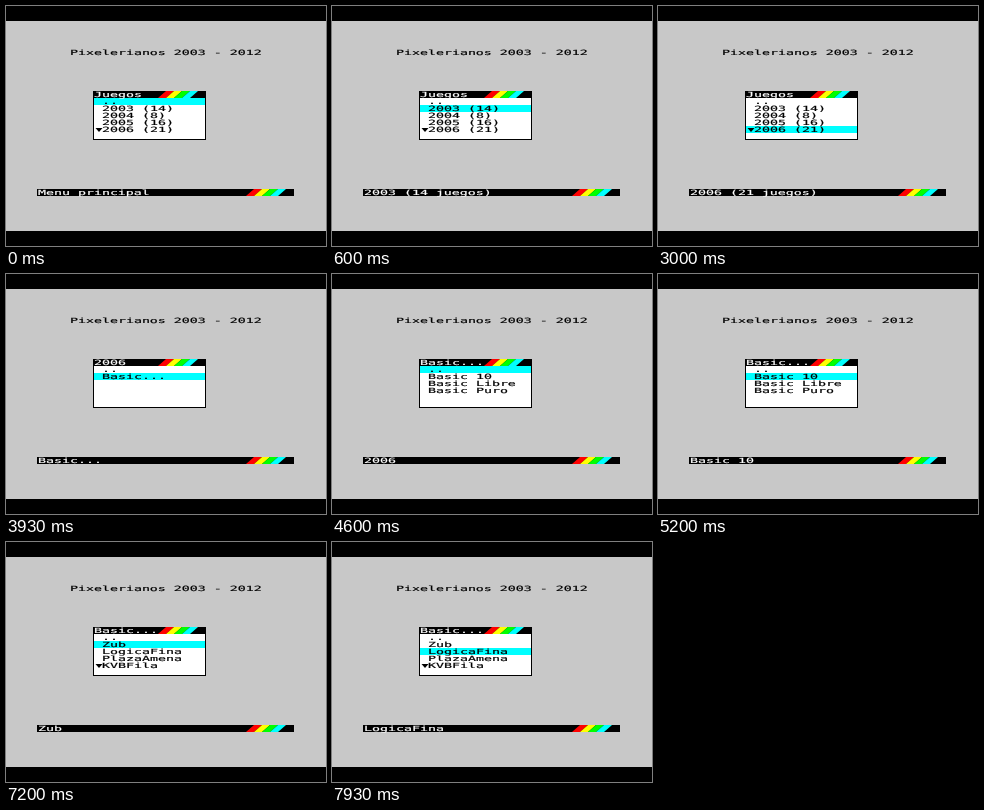
Animation of 320 by 240 pixels, one loop 8000 ms. Source, as an HTML page:

```html
<!DOCTYPE html>
<html lang="es">
<head>
<meta charset="utf-8">
<title>Menú</title>
<style>
  html, body { margin: 0; width: 100%; height: 100%; overflow: hidden; background: #000; }
  svg { display: block; width: 320px; height: 240px; }
  text {
    font: 7.2px "DejaVu Sans Mono", monospace;
    white-space: pre;
    text-rendering: geometricPrecision;
    stroke-width: .15;
  }
  .ink { fill: #000; stroke: #000; }
  .paper { fill: #fff; stroke: #fff; }
</style>
</head>
<body>
<svg id="stage" viewBox="0 0 320 240"></svg>
<script>
const LOOP = 8000;
const CELL_W = 8, CELL_H = 7, LEFT = 32, TOP = 36;
const WIDE = CELL_W / (7.2 * 0.602); // pixels of the screen are wider than tall
const stage = document.getElementById('stage');

const colX = c => LEFT + c * CELL_W;
const rowY = r => TOP + r * CELL_H;

function add(tag, attrs) {
  const el = document.createElementNS('http://www.w3.org/2000/svg', tag);
  for (const k in attrs) el.setAttribute(k, attrs[k]);
  stage.appendChild(el);
  return el;
}

const rect = (x, y, width, height, fill) => add('rect', { x, y, width, height, fill });

function label(col, row, cls, str = '') {
  const el = add('text', {
    class: cls,
    transform: `translate(${colX(col)} ${rowY(row) + 6.1}) scale(${WIDE} 1)`
  });
  el.textContent = str;
  return el;
}

function stripes(col, row) {
  const y = rowY(row);
  ['#f00', '#ff0', '#0f0', '#0ff'].forEach((fill, i) => {
    const x = colX(col + i);
    add('path', { fill, d: `M${x} ${y + 7}L${x + 8} ${y}H${x + 16}L${x + 8} ${y + 7}Z` });
  });
}

// fixed parts
rect(0, 15, 320, 210, '#c8c8c8');
label(4, 1, 'ink', 'Pixelerianos 2003 - 2012');
rect(87, 85, 113, 49, '#000');
rect(88, 92, 111, 41, '#fff');
rect(31, 183, 257, 7, '#000');
stripes(15, 7);
stripes(26, 21);

// changing parts
const bar = rect(88, 92, 111, 7, '#0ff');
const title = label(7, 7, 'paper');
const items = [8, 9, 10, 11, 12].map(r => label(8, r, 'ink'));
const more = add('path', { d: 'M89.5 122H96.5L93 126Z' });
const status = label(0, 21, 'paper');

const menus = {
  games: { title: 'Juegos', more: true, items: ['..', '2003 (14)', '2004 (8)', '2005 (16)', '2006 (21)'] },
  year: { title: '2006', items: ['..', 'Basic...'] },
  basic: { title: 'Basic...', items: ['..', 'Basic 10', 'Basic Libre', 'Basic Puro'] },
  pure: { title: 'Basic...', more: true, items: ['..', 'Zub', 'LogicaFina', 'PlazaAmena', 'KVBFila'] }
};

// start time, menu, selected line, status text
const steps = [
  [0, 'games', 0, 'Menu principal'],
  [400, 'games', 1, '2003 (14 juegos)'],
  [800, 'games', 2, '2004 (8 juegos)'],
  [1270, 'games', 3, '2005 (16 juegos)'],
  [1600, 'games', 4, '2006 (21 juegos)'],
  [3330, 'year', 0, 'Juegos'],
  [3800, 'year', 1, 'Basic...'],
  [4200, 'basic', 0, '2006'],
  [4870, 'basic', 1, 'Basic 10'],
  [5270, 'basic', 2, 'Basic Libre'],
  [5670, 'basic', 3, 'Basic Puro'],
  [6270, 'pure', 0, 'Basic...'],
  [6930, 'pure', 1, 'Zub'],
  [7670, 'pure', 2, 'LogicaFina']
];

let shown;
function show(step) {
  if (step === shown) return;
  shown = step;
  const [, name, line, text] = step;
  const menu = menus[name];
  title.textContent = menu.title;
  items.forEach((el, i) => { el.textContent = menu.items[i] || ''; });
  more.style.display = menu.more ? '' : 'none';
  bar.setAttribute('y', rowY(8 + line));
  status.textContent = text;
}

function tick() {
  const t = performance.now() % LOOP;
  show(steps.filter(s => s[0] <= t).pop());
  requestAnimationFrame(tick);
}
tick();
</script>
</body>
</html>
```
